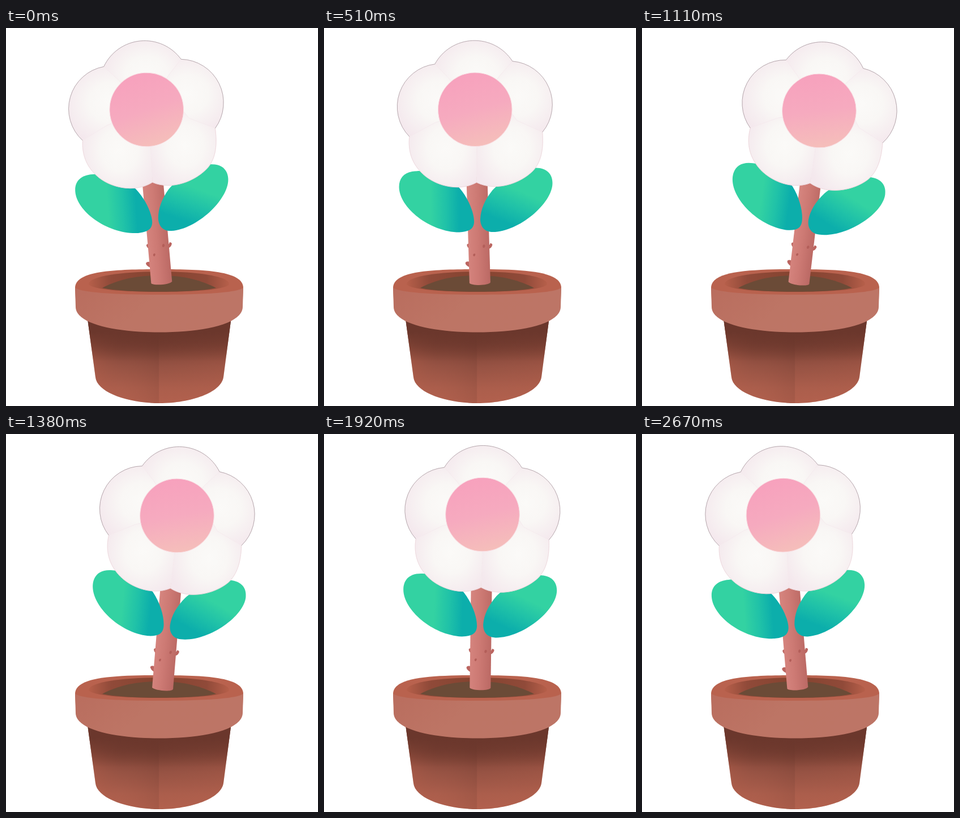
An HTML page that plays this animation: 551x669 px, repeating every 2700 ms.

```html
<!DOCTYPE html>
<html lang="en">
<head>
<meta charset="utf-8">
<title>Swaying flower</title>
<style>
  html, body { margin: 0; width: 100%; height: 100%; overflow: hidden; background: #fff; }
  svg { display: block; width: 100vw; height: 100vh; }
</style>
</head>
<body>
<svg viewBox="0 0 551 669">
  <defs>
    <linearGradient id="body" x1="0" y1="535" x2="0" y2="662" gradientUnits="userSpaceOnUse">
      <stop offset="0" stop-color="#6b372c"/><stop offset=".18" stop-color="#733c30"/>
      <stop offset=".5" stop-color="#955243"/><stop offset=".8" stop-color="#ab5e4c"/>
      <stop offset="1" stop-color="#b2614e"/>
    </linearGradient>
    <linearGradient id="side">
      <stop offset="0" stop-color="#c0644e" stop-opacity=".4"/><stop offset=".22" stop-color="#a85a48" stop-opacity=".1"/>
      <stop offset=".495" stop-color="#6b372c" stop-opacity=".18"/><stop offset=".5" stop-color="#a85a48" stop-opacity=".06"/>
      <stop offset="1" stop-color="#b85f4a" stop-opacity=".25"/>
    </linearGradient>
    <linearGradient id="shade" x1="0" y1="0" x2="0" y2="1">
      <stop offset=".15" stop-color="#6b372c"/><stop offset=".5" stop-color="#6b372c" stop-opacity="0"/>
    </linearGradient>
    <linearGradient id="band" x1="0" y1="0" x2="1" y2=".3">
      <stop offset="0" stop-color="#b96d5e"/><stop offset=".5" stop-color="#bd7565"/><stop offset="1" stop-color="#bd7566"/>
    </linearGradient>
    <linearGradient id="inside">
      <stop offset="0" stop-color="#b65f4a"/><stop offset=".16" stop-color="#904a39"/>
      <stop offset=".5" stop-color="#84432f"/><stop offset=".84" stop-color="#904a39"/>
      <stop offset="1" stop-color="#b65f4a"/>
    </linearGradient>
    <linearGradient id="stem">
      <stop offset="0" stop-color="#d6857f"/><stop offset=".45" stop-color="#cd7a74"/><stop offset="1" stop-color="#bb6964"/>
    </linearGradient>
    <linearGradient id="leafL">
      <stop offset=".42" stop-color="#33d2a2"/><stop offset=".62" stop-color="#20c2a8"/><stop offset=".8" stop-color="#0caeab"/>
    </linearGradient>
    <linearGradient id="leafR" x1="350" y1="289" x2="325" y2="345" gradientUnits="userSpaceOnUse">
      <stop offset="0" stop-color="#33d2a2"/><stop offset=".5" stop-color="#1fc1a8"/><stop offset="1" stop-color="#0caeab"/>
    </linearGradient>
    <radialGradient id="petal" cx=".54" cy=".5" r=".6">
      <stop offset="0" stop-color="#fbfaf8"/><stop offset=".45" stop-color="#f9f7f5"/><stop offset="1" stop-color="#f4e8ed"/>
    </radialGradient>
    <linearGradient id="disk" x1=".36" y1="0" x2=".64" y2="1">
      <stop offset="0" stop-color="#f7a1bd"/><stop offset=".5" stop-color="#f6aabf"/><stop offset="1" stop-color="#f5bfba"/>
    </linearGradient>
    <path id="tub" d="M144 515L158 618C161 645 215 664 271 664S380 645 384 618L397.500 515Z"/>
  </defs>

  <g id="pot">
    <use href="#tub" fill="url(#body)"/>
    <use href="#tub" fill="url(#side)"/>
    <use href="#tub" fill="url(#shade)"/>
    <path fill="#b9624e" d="M122 460C122 430 190 427 271 427S419 430 419 460L418 480H123Z"/>
    <path fill="url(#inside)" d="M146 453C146 440 200 431 271 431S394 440 394 453C392 462 340 467 271 467S148 462 146 453Z"/>
    <path fill="#6b4b37" d="M170 460C195 447 225 438 271 438S345 447 371 460C345 465 312 466.500 271 466.500S196 465 170 460Z"/>
    <path fill="url(#band)" d="M122 459C127 467 180 472 271 472S415 467 419 459L418 494C417 525 345 538.500 271 538.500S124 525 123 494Z"/>
  </g>

  <g id="plant">
    <g fill="#bb6560">
      <path d="M258 380q-5 0-5 3q1 5 6 7zM259 413q-7-3-9 1q0 5 9 9z"/>
      <path d="M290 383q3 2 4-3q4 0 4 3q-2 7-8 7z"/>
    </g>
    <path fill="url(#stem)" d="M253 262H290L294 449C292 455 260 455 257 450Z"/>
    <path fill="#b35e59" d="M264 402q-1-4 3-4q2 2-1 5zM281 387q-1-5 3-5q3 3-1 6z"/>
    <path fill="url(#leafL)" d="M134 279C134 262 145 251 166 251C190 250 223 263 241 282C257 301 267 328 266 343C265 354 258 359 240 360C187 359 134 315 134 279Z"/>
    <path fill="url(#leafR)" d="M277 337C278 320 285 303 299 286C318 266 352 247 375 247C395 247 405 258 405 274C405 310 345 360 299 360C284 360 277 350 277 337Z"/>
    <g fill="url(#petal)" stroke="#f4e8ec" stroke-width=".6">
      <path d="M199 62A79.600 79.600 0 0 1 336 58L313 84L269 143L222 86Z"/>
      <path d="M336 58A77 77 0 0 1 388 184L343 163L334 150L269 143L313 84Z"/>
      <path d="M153 190A76 76 0 0 1 199 62L222 86L269 143L198 166Z"/>
      <path d="M153 190C150 215 157 236 172 252C193 276 238 290 271 272L272 214L269 143L198 166Z"/>
      <path d="M388 184C390 212 386 236 371 252C348 275 304 289 271 272L272 214L269 143L334 150L343 163Z"/>
    </g>
    <g fill="none" stroke-width=".8">
      <path stroke="#ecd5da" d="M153 190C150 215 157 236 172 252C193 276 238 290 271 272C304 289 348 275 371 252C386 236 390 212 388 184"/>
      <path stroke="#a8999f" d="M153 190A76 76 0 0 1 199 62A79.600 79.600 0 0 1 336 58A77 77 0 0 1 388 184"/>
    </g>
    <circle cx="269.300" cy="143" r="65.300" fill="url(#disk)" stroke="#f9dfe4"/>
  </g>
</svg>
<script>
  const LOOP = 2700, STEP = 30;
  const plant = document.getElementById('plant');
  // [time in ms, value], joined by straight lines
  const sway = [[0, -3.81], [600, 0.13], [1110, 7.9], [LOOP, -3.81]];
  const bob = [[0, 0.4], [840, 1.8], [1110, 1.3], [1650, -0.5], [LOOP, -0.3]];

  function valueAt(keys, t) {
    const i = keys.findIndex(([time]) => time > t);
    const [t0, v0] = keys[i - 1], [t1, v1] = keys[i];
    return v0 + (v1 - v0) * (t - t0) / (t1 - t0);
  }

  function draw(now) {
    const t = Math.floor(now % LOOP / STEP) * STEP;
    plant.setAttribute('transform',
      `translate(0 ${valueAt(bob, t)}) rotate(${valueAt(sway, t)} 275.3 460)`);
  }

  const start = performance.now();
  function tick() {
    draw(performance.now() - start);
    requestAnimationFrame(tick);
  }
  tick();
</script>
</body>
</html>
```
